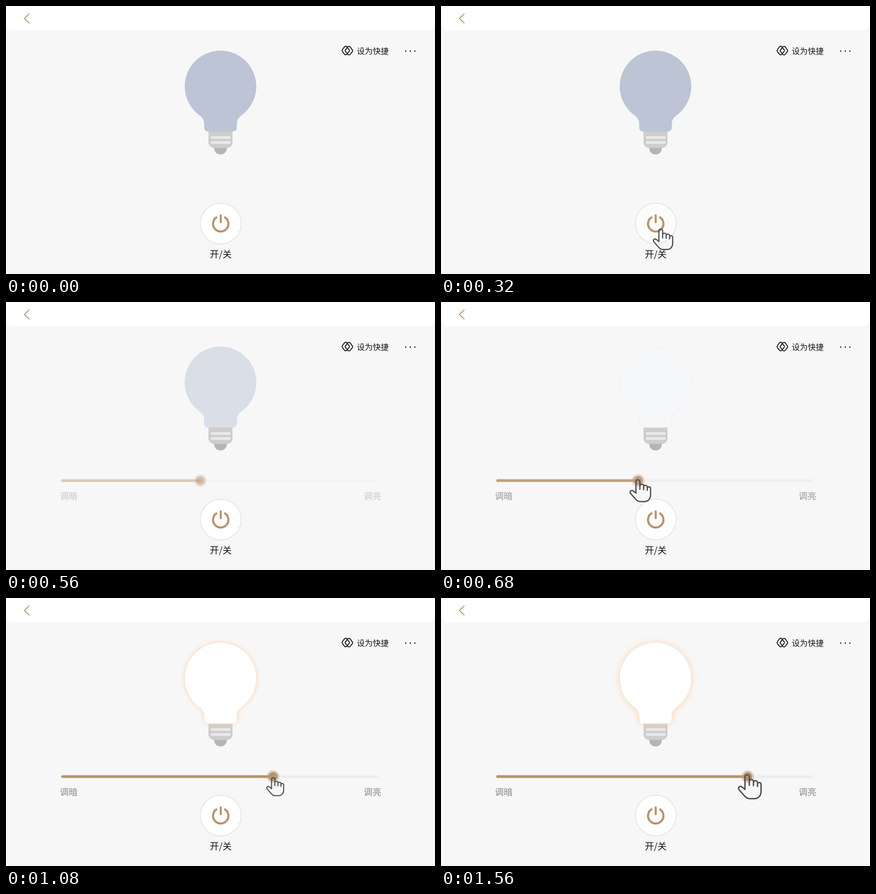
Recreate the animation shown at these times as an HTML page. Size 947 px wide and 592 px high, loop 1.6 s.

```html
<!DOCTYPE html>
<html lang="zh-CN">
<head>
<meta charset="utf-8">
<style>
  html, body { margin: 0; width: 100%; height: 100%; overflow: hidden; background: #f7f7f7; }
  svg { display: block; width: 947px; height: 592px; }
  text { font: 500 17.6px "Noto Sans CJK SC", "Noto Sans CJK", sans-serif; fill: #141414; }
  .line { fill: none; stroke-linecap: round; stroke-linejoin: round; }
  .hint { font-weight: 400; font-size: 19.5px; fill: #888; }
</style>
</head>
<body>
<svg viewBox="0 0 947 592">
  <defs>
    <filter id="blur" x="-20%" y="-20%" width="140%" height="140%">
      <feGaussianBlur id="spread" stdDeviation="0"/>
    </filter>
    <path id="glass" d="M426.5 241A79 79 0 1 1 520.5 241C513 246.5 509.5 252.5 509.5 261V269a8.5 8.5 0 0 1-8.5 8.5H446a8.5 8.5 0 0 1-8.5-8.5V261C437.5 252.5 434 246.5 426.5 241Z"/>
    <path id="link" d="M756 95l-3.5-5q-.8-1-2-1h-1.500q-1 0-1.800 1l-5 6.800q-1 1.500 0 3l5.200 7q.8 1 2 1h1q1 0 1.800-1l5.500-7q1-1.500 0-3l-1-1.200"/>
  </defs>

  <rect width="947" height="592" fill="#f7f7f7"/>
  <path d="M0 0H947V38a16 16 0 0 1-16 16H16A16 16 0 0 1 0 38Z" fill="#fff"/>
  <path class="line" d="M51 17.500L40.500 27.500 51 37.500" stroke="#b9936c" stroke-width="2"/>

  <g class="line" stroke="#141414" stroke-width="2">
    <use href="#link"/>
    <use href="#link" transform="rotate(180 753.5 98.5)"/>
  </g>
  <text x="774.5" y="105.500">设为快捷</text>
  <g fill="#141414">
    <circle cx="882.5" cy="99.500" r="1.500"/>
    <circle cx="892.5" cy="99.500" r="1.500"/>
    <circle cx="902.5" cy="99.500" r="1.500"/>
  </g>

  <circle cx="473.5" cy="314" r="14" fill="#b5b5b5"/>
  <path d="M447 276H500V301a12.500 12.500 0 0 1-12.500 12.500H459.500A12.500 12.500 0 0 1 447 301Z" fill="#cdcdcd"/>
  <path class="line" d="M455 290.500H493M455 301.500H493" stroke="#e9e9e9" stroke-width="6"/>
  <use id="glow" href="#glass" fill="#ffd2a6" filter="url(#blur)"/>
  <use href="#glass" fill="#bcc4d5"/>
  <use id="lit" href="#glass" fill="#fff"/>

  <g class="line" stroke-width="6">
    <path class="fade" d="M125 394.500H818" stroke="#ededed"/>
    <path class="fade" id="fill" stroke="#b9936c"/>
  </g>
  <g id="knob" fill="#b9936c">
    <circle class="fade" r="14" fill="#b7a591" fill-opacity=".45"/>
    <circle class="fade" r="10"/>
  </g>
  <text class="hint fade" x="119" y="436">调暗</text>
  <text class="hint fade" x="789.5" y="436">调亮</text>

  <circle id="button" cx="474" cy="480.500" r="45" stroke="#e6e6e6" stroke-width="2"/>
  <path class="line" d="M464.500 467A17 17 0 1 0 483.500 467M474 462.500V477.500" stroke="#b9936c" stroke-width="4.600"/>
  <text x="474" y="555.500" text-anchor="middle" style="font-size:20px">开/关</text>

  <path id="hand" class="line" stroke="#4d4d4d" stroke-width="3" d="M-10.500 6V-21.500a4.800 4.800 0 0 1 9.600 0V-3M-.9-11a4.600 4.600 0 0 1 9.200 0v9M8.300-8.500a4.400 4.400 0 0 1 8.800 0v8M17.100-5a4 4 0 0 1 8 0V11C25 20 19 26.800 10 26.800H0C-6 26.800-10 23-13 19L-23.500 7C-27 2-22-2-18 .5Q-15 2-10.500 6.500"/>
</svg>
<script>
const LOOP = 1600, PRESSED = 0.75;
const $ = id => document.getElementById(id);
const fading = document.querySelectorAll('.fade');
const ramp = (t, from, to) => Math.min(1, Math.max(0, (t - from) / (to - from)));
const smooth = u => u * u * (3 - 2 * u);

// Cubic bezier (.33, 0, .5, 1), solved by bisection.
function drag(u) {
  let low = 0, high = 1;
  for (let i = 0; i < 20; i++) {
    const s = (low + high) / 2, r = 1 - s;
    if (0.99 * s * r * r + 1.5 * s * s * r + s * s * s < u) low = s; else high = s;
  }
  return smooth(low);
}

function draw(t) {
  const shown = ramp(t, 440, 720);
  const level = drag(ramp(t, 598, 1515));
  const x = 429 + 248 * level;

  fading.forEach(el => el.setAttribute('opacity', shown));
  $('lit').setAttribute('opacity', shown);
  $('glow').setAttribute('opacity', shown * ramp(level, 0, 0.1));
  $('spread').setAttribute('stdDeviation', 8 * level);
  $('fill').setAttribute('d', `M125 394.5H${x}`);
  $('knob').setAttribute('transform', `translate(${x} 394.5)`);

  const tapping = t < 520;
  const press = tapping
    ? smooth(ramp(t, 260, 370)) - smooth(ramp(t, 390, 480))
    : smooth(ramp(t, 640, 740)) - smooth(ramp(t, 1470, 1560));
  const visible = tapping
    ? ramp(t, 160, 240) - ramp(t, 440, 520)
    : ramp(t, 580, 660);
  const scale = 1 - (1 - PRESSED) * press;
  const place = tapping ? '490 515' : `${x + 4.5} 416.5`;
  $('hand').setAttribute('transform', `translate(${place}) scale(${scale})`);
  $('hand').setAttribute('opacity', visible);
  $('button').setAttribute('fill', tapping && press > 0.2 ? '#fcfcfc' : '#fff');
}

const start = performance.now();
function tick() {
  draw((performance.now() - start) % LOOP);
  requestAnimationFrame(tick);
}
tick();
</script>
</body>
</html>
```
